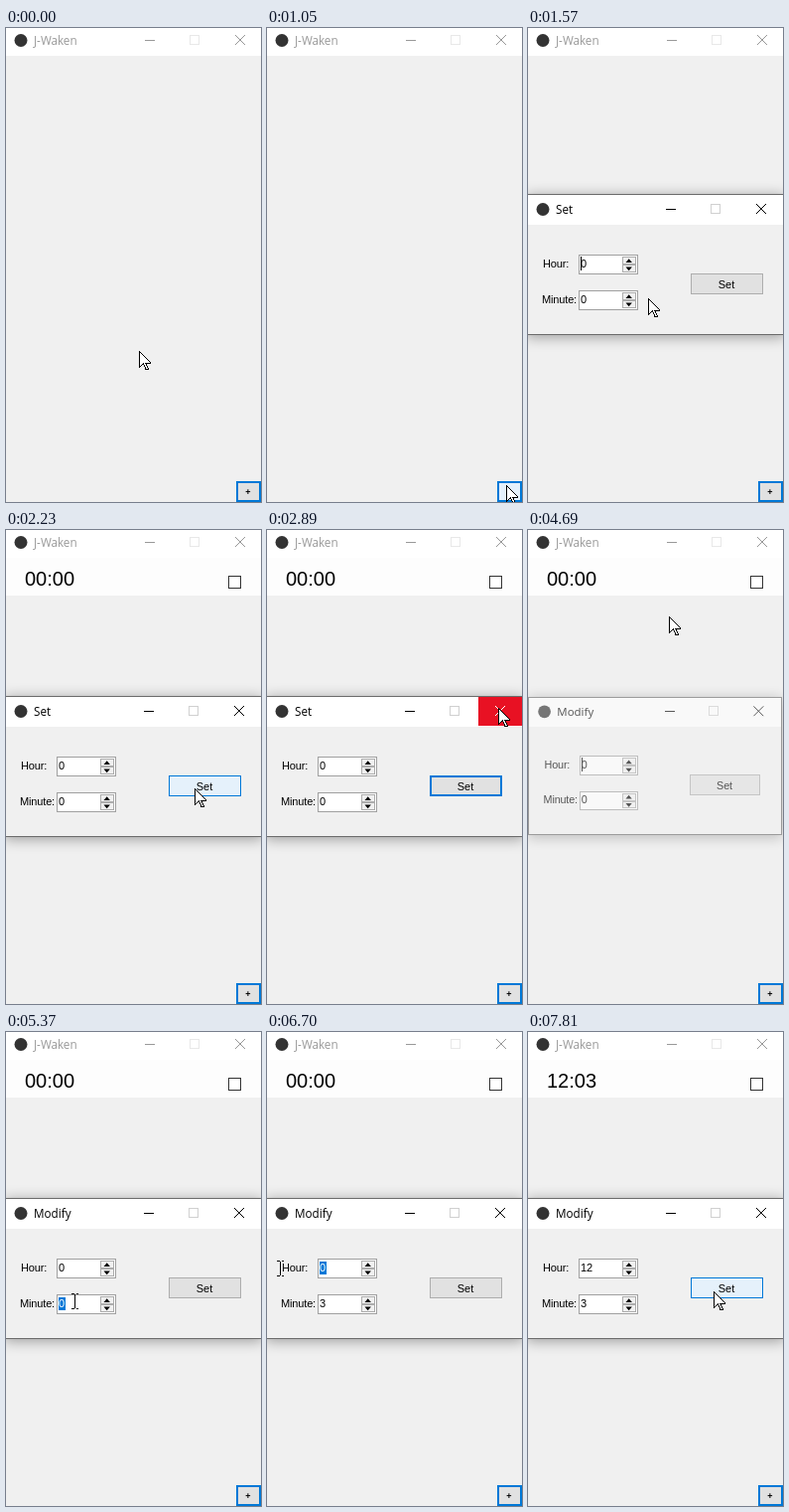
An HTML page that plays this animation: 257x477 px, repeating every 8000 ms.

```html
<!DOCTYPE html>
<html lang="en">
<head>
<meta charset="utf-8">
<title>Alarm list</title>
<style>
  html, body { margin: 0; width: 100%; height: 100%; overflow: hidden; background: #f0f0f0; }
  svg { display: block; width: 257px; height: 477px; }
  rect, .crisp { shape-rendering: crispEdges; }
  text { font: 11px "Liberation Sans", Arial, sans-serif; }
  .ui { font: 11.7px "Open Sans", "Noto Sans", sans-serif; }
  .item { font-size: 11px; }
  .time { font-size: 20px; }
  .plus { font-size: 9px; font-weight: bold; text-anchor: middle; }
  .btn { fill: #e1e1e1; stroke: #adadad; }
  .focus { stroke: #0078d7; stroke-width: 2; }
  .hover { fill: #e5f1fb; stroke: #0078d7; }
  .down { fill: #cce4f7; stroke: #005499; }
  .frame { fill: #f0f0f0; stroke: #6b6b6b; filter: drop-shadow(0 2px 7px rgba(0, 0, 0, .36)); }
  .small { fill: #f0f0f0; stroke: #adadad; }
  #main { color: #999; --max: #e8e8e8; }
  #main.active { color: #000; --max: #d0d0d0; }
  #dialog { transform-origin: 128.5px 238px; }
  #dialog.fade { opacity: .64; transform: translate(-.6px, -.8px) scale(.981); }
  #dialog.red { --close: #fff; }
  #dialog:not(.red) #alert, .off { display: none; }
  .sel { fill: #0078d7; }
  .picked text { fill: #fff; }
  .field:not(.picked) .sel, .field:not(.caret) .bar { display: none; }
</style>
</head>
<body>
<svg viewBox="0 0 257 477">
  <defs>
    <g id="caps" fill="none">
      <path class="crisp" d="M140 12.5h10" stroke="currentColor"/>
      <rect x="185.5" y="7.5" width="9" height="9" style="stroke: var(--max, #d0d0d0)"/>
      <path d="M231 7l10 10m0-10l-10 10" style="stroke: var(--close, currentColor)"/>
    </g>
    <g id="box">
      <rect x="51.5" y="228.5" width="59" height="19" fill="#fff" stroke="#a0a0a0"/>
      <rect class="small" x="95.5" y="230.5" width="13" height="7"/>
      <rect class="small" x="95.5" y="238.5" width="13" height="7"/>
      <path d="M98.5 236h6.4l-3.2-3.8zM98.5 240.5h6.4l-3.2 3.8z"/>
    </g>
  </defs>

  <rect width="257" height="477" fill="#f0f0f0"/>
  <g id="main">
    <rect width="257" height="28" fill="#fff"/>
    <circle cx="15" cy="12.5" r="6.5" fill="#333"/>
    <text class="ui" x="28" y="17" fill="currentColor">J-Waken</text>
    <use href="#caps"/>
  </g>
  <g id="row">
    <rect y="28" width="257" height="38" fill="#fdfdfd"/>
    <text class="time" id="alarm" x="19" y="56"></text>
    <rect x="224.5" y="46.5" width="12" height="12" fill="#fff" stroke="#333"/>
  </g>
  <rect id="add" x="233" y="457" width="23" height="19"/>
  <text class="plus" x="244" y="470">+</text>

  <g id="menu">
    <rect x="113" y="54" width="105" height="45" fill="#000" opacity=".15"/>
    <rect x="112" y="53" width="105" height="45" fill="#000" opacity=".2"/>
    <rect x="111" y="52" width="105" height="45" fill="#000" opacity=".2"/>
    <rect x="107.5" y="48.5" width="107" height="47" fill="#fdfdfd" stroke="#808080"/>
    <rect x="121" y="50" width="11" height="45" fill="#f0f0f0"/>
    <rect id="pick" x="109.5" y="50.5" width="103" height="21" fill="#b3d7f3" stroke="#0078d7"/>
    <text class="ui item" x="143" y="65">Reset</text>
    <text class="ui item" x="143" y="87">Delete</text>
  </g>

  <g id="dialog">
    <rect class="frame" x="-1.5" y="167.5" width="260" height="141"/>
    <rect x="-1" y="168" width="259" height="30" fill="#fff"/>
    <rect id="alert" x="213" y="168" width="45" height="29" fill="#e81123"/>
    <circle cx="15" cy="182.5" r="6.5" fill="#333"/>
    <text class="ui" id="caption" x="28" y="187"></text>
    <use href="#caps" x="-1" y="170"/>
    <text x="15" y="241" letter-spacing="-.15">Hour:</text>
    <text x="14" y="277" letter-spacing="-.15">Minute:</text>
    <g id="hour">
      <use href="#box"/>
      <rect class="sel" x="53" y="231" width="7" height="13"/>
      <text x="53" y="241"></text>
      <rect class="bar" x="53" y="230" width="1" height="14"/>
    </g>
    <g id="minute" transform="translate(0 36)">
      <use href="#box"/>
      <rect class="sel" x="53" y="231" width="7" height="13"/>
      <text x="53" y="241"></text>
      <rect class="bar" x="53" y="230" width="1" height="14"/>
    </g>
    <rect id="set"/>
    <text x="200" y="262" text-anchor="middle">Set</text>
  </g>

  <g id="cursor">
    <path id="arrow" class="crisp" d="M.5.5v16l4-4 2.5 6h2l.5-.5-2.5-5.5h4.5v-1z" fill="#fff" stroke="#000"/>
    <path id="beam" class="crisp" d="M-3 -7.5h2.5m2 0h2.5M-3 7.5h2.5m2 0h2.5M.5 -7v14" fill="none" stroke="#000"/>
  </g>
</svg>
<script>
const LOOP = 8000;
const $ = id => document.getElementById(id);

// Each step: time, pointer x, pointer y, changed properties
const glide = (start, n, x0, y0, x1, y1) =>
  Array.from({ length: n }, (_, i) => {
    const k = (i + 1) / n;
    return [start + i * 130, Math.round(x0 + (x1 - x0) * k), Math.round(y0 + (y1 - y0) * k)];
  });

const steps = [
  [0, 134, 325, {
    main: '', row: false, alarm: '00:00', add: 'focus', menu: false, pick: false,
    dialog: 'off', caption: 'Set', hour: 'caret', minute: '', hourText: '0', minuteText: '0',
    set: '', pointer: 'arrow'
  }],
  ...glide(270, 6, 134, 325, 234, 452),
  [1050, 241, 460, { add: 'focus hover' }],
  [1180, 241, 460, { add: 'focus', dialog: 'fade' }],
  [1310, 222, 430, { dialog: '' }],
  [1440, 165, 340],
  [1570, 121, 272],
  [1700, 158, 264],
  [1830, 190, 260, { set: 'hover' }],
  [2100, 190, 260, { set: 'down', hour: '' }],
  [2230, 190, 260, { set: 'hover', row: true }],
  [2490, 196, 252],
  [2630, 213, 222, { set: 'focus' }],
  [2760, 230, 188, { dialog: 'red' }],
  [2890, 233, 179],
  [3020, 215, 150, { dialog: 'fade red', main: 'active' }],
  [3150, 148, 83, { dialog: 'off' }],
  [3300, 125, 64],
  [3430, 112, 53],
  [3580, 107, 48],
  [3840, 107, 48, { menu: true }],
  [4140, 160, 64, { pick: true }],
  [4290, 162, 65],
  [4690, 142, 87, { menu: false, main: '', dialog: 'fade', caption: 'Modify', hour: 'caret', set: '' }],
  [4840, 117, 190, { dialog: '' }],
  [4960, 92, 278, { pointer: 'beam' }],
  [5100, 90, 273, { hour: '', minute: 'caret' }],
  [5230, 89, 273],
  [5370, 69, 271, { minute: 'picked' }],
  [6030, 69, 271, { minute: '', minuteText: '3' }],
  [6160, 69, 257],
  [6290, 67, 239, { hour: 'caret' }],
  [6420, 57, 238],
  [6550, 38, 238, { hour: 'picked' }],
  [6700, 13, 238],
  [6830, 10, 238, { pointer: 'arrow' }],
  [6960, 10, 238, { hour: '', hourText: '1' }],
  [7110, 10, 238, { hourText: '12', pointer: '' }],
  [7260, 136, 248, { pointer: 'arrow' }],
  [7410, 187, 261, { set: 'hover' }],
  [7690, 187, 261, { set: 'down', alarm: '12:03' }],
  [7810, 187, 261, { set: 'hover' }]
];

let state = {};
const states = steps.map(([t, x, y, change]) => (state = { ...state, ...change, t, x, y }));

const show = (id, on) => $(id).classList.toggle('off', !on);
const setClass = (id, name) => $(id).setAttribute('class', name);

function field(id, cls, value) {
  setClass(id, 'field ' + cls);
  $(id).querySelector('text').textContent = value;
}

function setButton(look) {
  const inset = look === 'focus' ? 1 : .5;
  const box = { x: 164 + inset, y: 247 + inset, width: 73 - 2 * inset, height: 21 - 2 * inset };
  for (const key in box) $('set').setAttribute(key, box[key]);
  setClass('set', 'btn ' + look);
}

function draw(s) {
  setClass('main', s.main);
  setClass('dialog', s.dialog);
  setClass('add', 'btn ' + s.add);
  for (const id of ['row', 'menu', 'pick']) show(id, s[id]);
  for (const id of ['alarm', 'caption']) $(id).textContent = s[id];
  field('hour', s.hour, s.hourText);
  field('minute', s.minute, s.minuteText);
  setButton(s.set);
  for (const id of ['arrow', 'beam']) show(id, s.pointer === id);
  $('cursor').setAttribute('transform', `translate(${s.x} ${s.y})`);
}

let shown;
const origin = performance.now();
function tick() {
  const t = (performance.now() - origin) % LOOP;
  const now = states.filter(s => s.t <= t).pop();
  if (now !== shown) draw(shown = now);
  requestAnimationFrame(tick);
}
tick();
</script>
</body>
</html>
```
